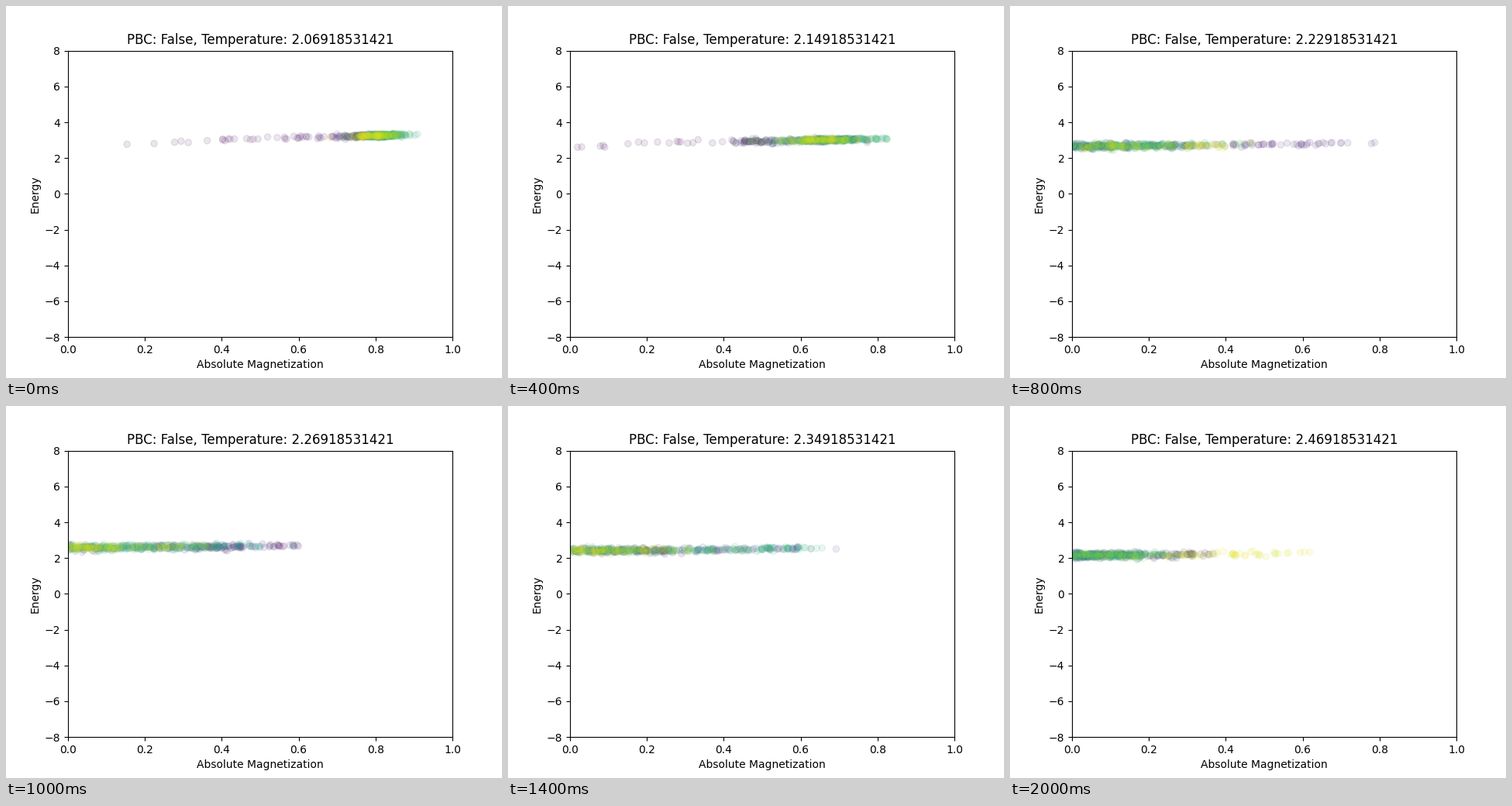
A matplotlib script that plays this animation: 640 px wide and 480 px high, repeating every 2.1 s.

```python
import numpy as np
import matplotlib.pyplot as plt
from matplotlib.animation import FuncAnimation

STEPS = 21
POINTS = 500
T_START, T_STEP = 2.06918531421, 0.02

run = np.linspace(0, 1, POINTS)


def drift(rng, keep=0.97):
    """Slow random motion with unit variance."""
    kicks = rng.normal(size=POINTS)
    out = np.empty(POINTS)
    out[0] = kicks[0]
    for k in range(1, POINTS):
        out[k] = keep * out[k - 1] + np.sqrt(1 - keep ** 2) * kicks[k]
    return out


def magnetization(step, rng):
    """Order builds up from a random start, then collapses sooner when hotter."""
    level = 0.83 - 0.028 * step
    swing = min(0.02 + 0.02 * step, 0.5 * level)
    rise = 1 - 0.85 * np.exp(-(run / (0.045 + 0.01 * step)) ** 0.7)
    collapse = 17 / max(step, 1) ** 2
    order = 0.5 - 0.5 * np.tanh((run - collapse) / 0.08)
    jitter = 0.025 * rng.normal(size=POINTS)
    return np.abs(level * rise * order + swing * drift(rng) + jitter)


def samples(step):
    rng = np.random.default_rng(step)
    mag = magnetization(step, rng)
    spread = 0.085 - 0.05 * mag
    energy = 3.02 - 0.043 * step + 0.35 * mag ** 2
    energy += spread * rng.normal(size=POINTS)
    energy -= 0.35 * (1 - step / STEPS) * np.exp(-run / 0.006)
    return np.column_stack([mag, energy])


fig, ax = plt.subplots(figsize=(6.4, 4.8), dpi=100)
ax.set(xlim=(0, 1), ylim=(-8, 8),
       xlabel="Absolute Magnetization", ylabel="Energy")
title = ax.set_title("")
dots = ax.scatter(run, run, c=run, cmap="viridis", alpha=0.1)


def update(step):
    dots.set_offsets(samples(step))
    title.set_text(f"PBC: False, Temperature: {T_START + T_STEP * step:.11f}")
    return dots, title


anim = FuncAnimation(fig, update, frames=STEPS, interval=100,
                     repeat=True, repeat_delay=0, blit=False)
plt.show()
```
